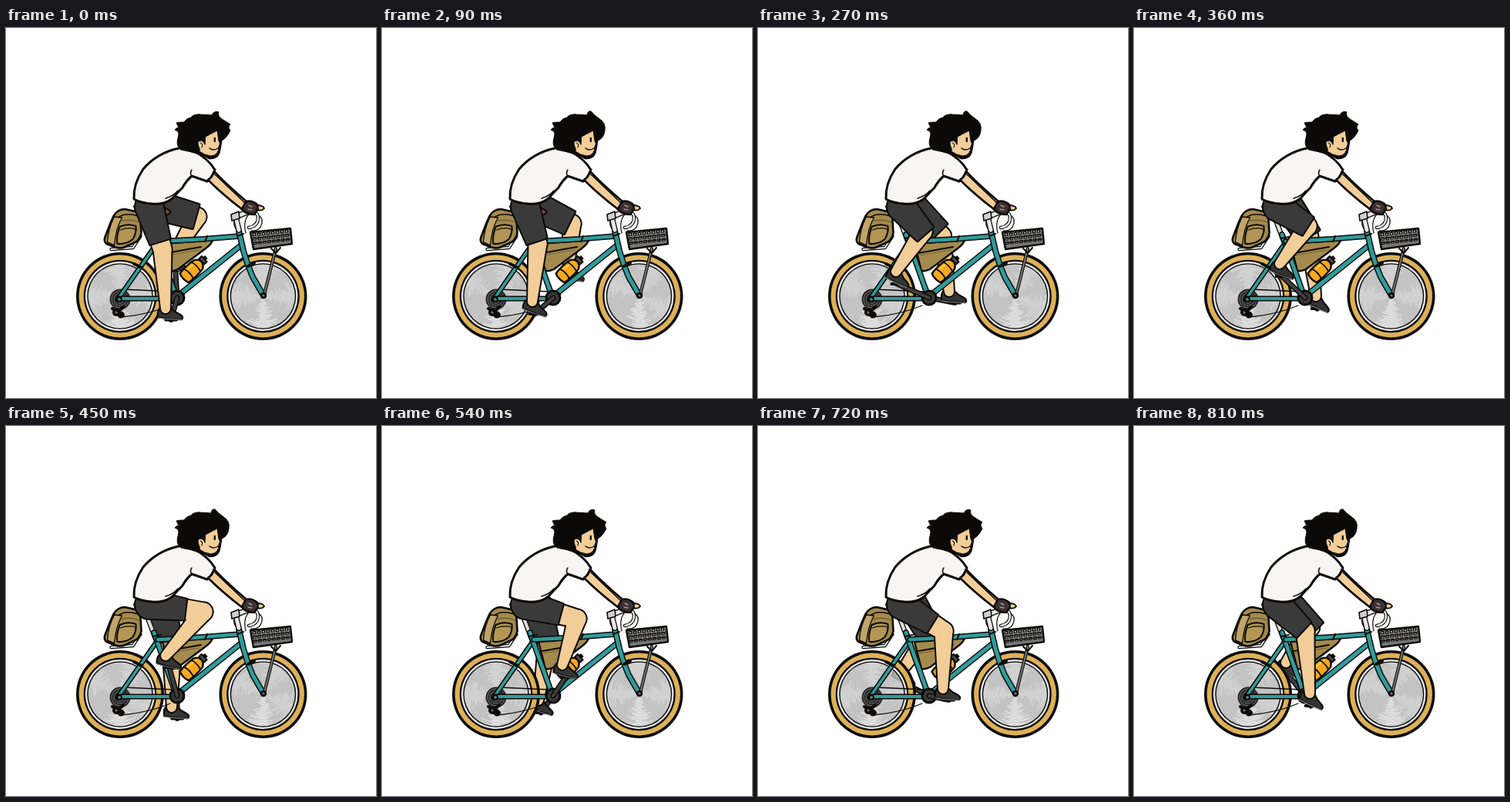
Write an HTML page with a canvas that moves like this. It is 480 by 480 pixels and loops after 900 ms.

```html
<!DOCTYPE html>
<html lang="en">
<head>
<meta charset="utf-8">
<title>Cyclist</title>
<style>
  html, body { margin: 0; width: 100%; height: 100%; overflow: hidden; background: #fff; }
  canvas { display: block; width: 480px; height: 480px; }
</style>
</head>
<body>
<canvas id="stage" width="480" height="480"></canvas>
<script>
const ctx = document.getElementById('stage').getContext('2d');
const STEP = 90, COUNT = 10;
const INK = '#0b0a09', SKIN = '#f3cd98', TEAL = '#2f9c9b', CLOTH = '#3b3a3a',
      TAN = '#a48a4c', TYRE = '#dcb158', SILVER = '#dcdcdc';
const HIP = [186, 232], CRANK = [222, 350];

// knee x, knee y, ankle x, ankle y, shoe tilt in degrees
const POSES = [
  [203, 287, 207, 364, 3], [202, 280, 195, 355, 18],
  [203, 273, 177, 334, 26], [214, 264, 179, 316, 25],
  [225, 257, 189, 306, 20], [256, 241, 207, 298, 12],
  [253, 250, 234, 310, 13], [249, 258, 241, 328, 8],
  [241, 266, 240, 341, 3], [222, 266, 228, 347, 24]
];

function shape(d, fill, width = 2, line = INK) {
  const p = new Path2D(d);
  if (fill) { ctx.fillStyle = fill; ctx.fill(p); }
  if (width) { ctx.strokeStyle = line; ctx.lineWidth = width; ctx.stroke(p); }
}

function tube(d, width, color, edge = 3) {
  shape(d, null, width + edge);
  shape(d, null, width, color);
}

function disc(x, y, r, fill) {
  ctx.fillStyle = fill;
  ctx.beginPath();
  ctx.arc(x, y, r, 0, 7);
  ctx.fill();
}

function random(seed) {
  return () => {
    seed = (seed * 16807) % 2147483647;
    return seed / 2147483647;
  };
}

// Tapered capsule between two circles
function limb(a, b, ra, rb) {
  const t = Math.atan2(b[1] - a[1], b[0] - a[0]);
  const p = new Path2D();
  p.arc(a[0], a[1], ra, t + Math.PI / 2, t - Math.PI / 2);
  p.arc(b[0], b[1], rb, t - Math.PI / 2, t + Math.PI / 2);
  p.closePath();
  return p;
}

function paint(paths, fill, width = 4.5) {
  ctx.strokeStyle = INK;
  ctx.lineWidth = width;
  paths.forEach(p => ctx.stroke(p));
  ctx.fillStyle = fill;
  paths.forEach(p => ctx.fill(p));
}

// The far hip sits further forward, so its knee swings less
function legPose(i, far) {
  const [kx, ky, ax, ay, deg] = POSES[i % COUNT];
  const tilt = deg * Math.PI / 180, cos = Math.cos(tilt), sin = Math.sin(tilt);
  const ankle = far ? [ax + 8, ay + 1] : [ax, ay];
  return {
    hip: far ? [HIP[0] + 15, HIP[1]] : HIP,
    knee: far ? [215 + 0.62 * (kx - 203), ky + 4] : [kx, ky],
    hemWidth: far ? 16 : 13.5,
    ankle, tilt,
    pedal: [ankle[0] + 8 * cos - 14 * sin, ankle[1] + 8 * sin + 14 * cos]
  };
}

function crankArm({ pedal: [x, y] }) {
  tube(`M${CRANK}L${x} ${y}`, 4, '#3f3f3f');
  shape(`M${x - 7} ${y}h14`, null, 4);
}

function leg({ hip, knee, ankle, tilt, hemWidth }) {
  const a = Math.atan2(knee[1] - hip[1], knee[0] - hip[0]);
  const hem = [hip[0] + 47 * Math.cos(a), hip[1] + 47 * Math.sin(a)];

  ctx.save();
  ctx.translate(...ankle);
  ctx.rotate(tilt);
  shape('M-8 0Q-11 5-9 12Q6 14 22 13Q25 9 18 6Q12 4 7-1Z', '#343434', 2.2);
  shape('M-9 12.5Q6 14.5 22 13', null, 1, '#8d8d8d');
  ctx.restore();

  paint([limb(hip, knee, 15, 11.5), limb(knee, ankle, 11.5, 6)], SKIN, 4);

  // Shorts end in a flat hem
  const nx = -Math.sin(a) * hemWidth, ny = Math.cos(a) * hemWidth;
  const p = new Path2D();
  p.arc(hip[0], hip[1], 18, a + Math.PI / 2, a - Math.PI / 2);
  p.lineTo(hem[0] - nx, hem[1] - ny);
  p.lineTo(hem[0] + nx, hem[1] + ny);
  p.closePath();
  paint([p], CLOTH, 4);
}

// Brushed disc: pale streaks gather below the hub and at alternating sides
function wheel(x, y, i, seed) {
  disc(x, y, 57, INK);
  disc(x, y, 53.4, TYRE);
  disc(x, y, 47.3, INK);
  disc(x, y, 45, '#ececec');
  disc(x, y, 42.8, INK);
  disc(x, y, 41.4, '#c3c3c3');

  const rnd = random(seed + i * 7001), turn = i % 2 ? 0.5 : 0;
  ctx.lineWidth = 0.8;
  for (let r = 4; r < 41; r += 1.4) {
    for (let k = 0; k < 4; k++) {
      const mid = k * Math.PI / 2 + (k === 1 ? 0 : turn);
      ctx.strokeStyle = k === 1 ? '#f0f0f0' : '#dedede';
      ctx.beginPath();
      ctx.arc(x, y, r, mid - 0.1 - rnd() * 0.5, mid + 0.1 + rnd() * 0.5);
      ctx.stroke();
    }
  }
}

// Dim trace of the far leg seen through the spinning rear wheel
function ghost(pose) {
  ctx.save();
  ctx.beginPath();
  ctx.arc(148, 348, 41, 0, 7);
  ctx.clip();
  ctx.globalAlpha = 0.15;
  leg(pose);
  ctx.restore();
}

function backpack() {
  ctx.save();
  ctx.translate(1.5, 2);
  tube('M135 285L163 283L173 268', 2, '#eee', 2.4);
  shape('M138 242Q143 233 153 233L166 236Q172 238 173 247L174 264Q173 270 168 275L153 282Q147 285 139 282L129 278Q125 275 127 269L134 251Z', TAN, 2.6);
  shape('M139 243Q131 258 130 276L139 280Q141 258 149 244Z', '#c2a469', 1.4);
  shape('M145 243Q155 237 170 242', null, 1.6);
  shape('M147 249Q158 245 172 250', null, 1.2, '#6b552b');
  shape('M146 256Q156 251 167 255Q168 264 163 272Q154 279 143 278Q141 271 146 256Z', '#b39653', 2);
  shape('M147 260Q157 256 166 259', null, 1.2);
  ctx.restore();
}

function saddle() {
  tube('M182 244L194 276', 4, SILVER, 2.6);
  shape('M166 231Q174 225 188 231Q204 230 214 238Q211 244 202 242L182 244Q168 242 166 231Z', '#7b5034', 2);
}

function frameBag() {
  shape('M203 280L268 275Q267 280 259 286L223 313Q217 316 212 315Z', TAN, 2.4);
  shape('M208 292L253 284', null, 1.8);
  shape('M209 295L250 288', null, 1, '#766033');
}

function bottle() {
  ctx.save();
  ctx.translate(242, 314);
  ctx.rotate(-0.76);
  shape('M-15-8Q-18 0-15 8Q-3 10 10 8Q15 6 16 0Q15-6 10-8Q-3-10-15-8Z', '#f6a91d', 2.4);
  shape('M-7-8.5Q-4 0-7 8.5M6-8.5Q9 0 6 8.5', null, 1.8);
  shape('M-4-5H5', null, 2, '#ffcb4c');
  shape('M16-5H21V5H16Z', '#494949', 2);
  shape('M21-2H24V2H21Z', INK, 1.5);
  ctx.restore();
}

function drivetrain() {
  disc(148, 352, 13.5, '#272727');
  for (let r = 5; r < 13; r += 3) {
    ctx.strokeStyle = '#858585';
    ctx.lineWidth = 0.8;
    ctx.beginPath();
    ctx.arc(148, 352, r, 0.3, 5.7);
    ctx.stroke();
  }
  shape('M152 362L145 369M138 364L152 372', null, 4);
  disc(143, 369, 5, INK);
  disc(149, 372, 4.5, INK);
  disc(143, 369, 1.5, '#777');
  shape('M150 375Q184 372 213 360M151 339L218 342', null, 1.3);
}

function bikeFrame() {
  tube('M196 279L145 352', 3.6, TEAL);
  tube('M147 351H221', 3.8, TEAL);
  tube('M192 268L221 349', 4.8, TEAL);
  tube('M197 277Q250 275 303 270', 4.6, TEAL);
  tube('M306 281L226 345', 5, TEAL);
  tube('M302 263L308 289Q313 307 320 323L334 347', 5, TEAL);
  shape('M190 273L201 271M258 277L261 270M300 270L308 267', null, 2);
  shape('M166 306L176 311M314 309L322 305', null, 4);
  disc(147, 352, 4, INK);
  disc(147, 352, 1.8, TEAL);
}

function chainring() {
  disc(CRANK[0], CRANK[1], 10.5, INK);
  disc(CRANK[0], CRANK[1], 7.5, '#393939');
  disc(CRANK[0], CRANK[1], 2.6, '#666');
}

function cockpit() {
  shape('M301 264Q291 253 300 244M317 240Q334 242 332 253Q330 264 318 263', null, 1.3);
  tube('M302 262L298 245L315 238', 5, '#e8e8e8', 2.6);
  tube('M314 239Q326 236 327 246Q327 257 315 259', 2.2, '#f3f3f3', 2.2);
  shape('M292 242L302 238L303 247L293 250Z', '#d0d0d0', 1.6);
  shape('M316 241Q307 249 311 266', null, 1.2);
}

function basket() {
  tube('M350 286L335 346', 2, '#777', 2.2);
  shape('M344 286L350 292L356 285', null, 2);
  shape('M317 265L369 260L371 280L321 287Z', '#777', 2.4);
  for (let row = 0; row < 3; row++) {
    for (let k = 0; k < 8; k++) {
      const x = 322 + k * 6 + row * 0.7, y = 268 + row * 5.5 - k * 0.65;
      shape(`M${x - 1.6} ${y - 1.2}l3.2-.3v2.8l-3.2.3z`, '#b2b2b2', 1.1);
    }
  }
  shape('M320 273L368 268M321 279L369 274', null, 1);
  disc(334, 347, 4.2, INK);
  disc(334, 347, 1.5, '#777');
}

function torso() {
  shape('M224 156Q232 154 244 160Q262 169 271 184Q267 194 261 199L241 192Q234 198 229 207Q222 214 216 221Q205 230 189 228Q175 227 166 222Q165 202 178 183Q196 162 224 156Z', '#f7f6f5', 3);
  shape('M241 192Q238 188 241 184M207 221Q217 218 223 211', null, 1.5);
}

function arm() {
  shape('M270 186Q288 205 312 225L306 235Q281 216 262 197Q268 194 270 186Z', SKIN, 2.6);
  shape('M271 190L310 227', null, 1.4);
  shape('M325 230Q334 230 335 234Q332 238 324 236Z', SKIN, 1.8);
  shape('M311 225Q319 223 326 229L327 235L322 242Q311 242 306 235Z', '#3b3034', 2.4);
  shape('M315 230l4 2M314 235l5 1', null, 1.4, '#a99a80');
}

function head(odd) {
  const crown = odd
    ? 'M250 112L266 113Q267 107 271 108Q275 113 281 117Q291 123 289 133Q288 143 280 146'
    : 'M250 112L267 113Q270 107 276 109Q274 114 280 118L291 125Q287 128 291 133Q286 143 280 146';
  shape(crown + 'L278 158Q277 170 264 170Q256 165 248 163Q238 160 227 158Q220 153 223 143Q225 137 223 134L219 132Q220 130 224 129L221 123Q226 122 231 122Q234 117 240 116Q243 112 250 112Z', INK, 1);
  shape('M259 141Q266 137 274 133L276 146Q279 150 276 154Q276 165 266 166Q257 165 251 160Q252 157 250 154Q247 146 253 146Q257 147 258 151Z', SKIN, 1);
  shape('M252 149Q256 150 254 155', null, 1.1);
  shape('M264 156Q269 160 275 156', null, 1.4);
  shape('M270.8 143v4', null, 2.3);
}

function draw(i) {
  const near = legPose(i), far = legPose(i + COUNT / 2, true);
  ctx.clearRect(0, 0, 480, 480);
  ctx.lineCap = ctx.lineJoin = 'round';

  crankArm(far);
  leg(far);
  wheel(148, 348, i, 91);
  wheel(333.5, 348, i, 517);
  ghost(far);
  backpack();
  saddle();
  drivetrain();
  frameBag();
  bottle();
  bikeFrame();
  chainring();
  cockpit();
  basket();
  crankArm(near);
  leg(near);
  torso();
  arm();
  head(i % 2);
}

const start = performance.now();
let shown = -1;
function tick() {
  const i = Math.floor((performance.now() - start) / STEP) % COUNT;
  if (i !== shown) draw(shown = i);
  requestAnimationFrame(tick);
}
tick();
</script>
</body>
</html>
```
